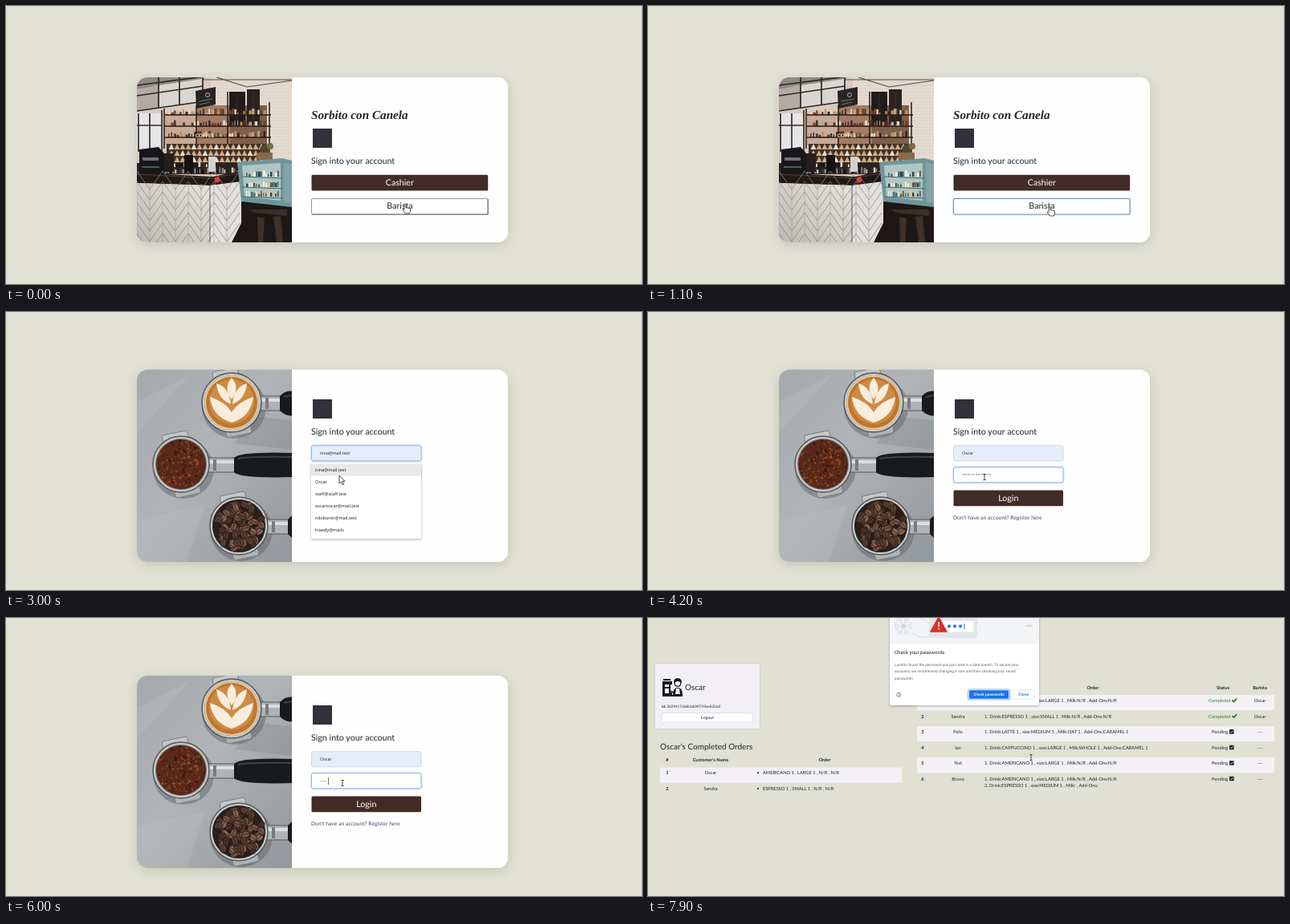
Animation, 792 px wide and 347 px high, one loop 8 s. Source, as an HTML page:

```html
<!DOCTYPE html>
<html lang="en">
<head>
<meta charset="utf-8">
<title>Coffee shop sign-in</title>
<style>
  html, body { margin: 0; width: 100%; height: 100%; overflow: hidden; background: #e1e2d4; }
  svg { display: block; }
  text { font-family: Lato, sans-serif; fill: #212529; text-rendering: geometricPrecision; }
  .mid { text-anchor: middle; }
  .bold { font-weight: 700; }
  .script { font: italic 700 15.2px "Liberation Serif", serif; }
  .field { font-family: "Noto Sans", sans-serif; }
  .dialog { font-family: Roboto, sans-serif; }
  .card { filter: drop-shadow(0 3px 7px rgba(60, 60, 40, .17)); }
  .glow { filter: drop-shadow(0 0 1px #9dbff2); }
  .pop { filter: drop-shadow(0 1px 1.5px rgba(0, 0, 0, .3)); }
</style>
</head>
<body>
<svg id="stage" width="792" height="347" viewBox="0 0 792 347"></svg>
<script>
const LOOP = 8000;
const BROWN = '#432c25';

let seed = 11;
const rnd = (a = 0, b = 1) => a + (b - a) * (seed = seed * 16807 % 2147483647) / 2147483647;
const pick = list => list[Math.floor(rnd(0, list.length))];
const times = (n, make) => Array.from({ length: n }, (_, i) => make(i)).join('');

const rect = (x, y, w, h, fill, more = '') =>
  `<rect x="${x}" y="${y}" width="${w}" height="${h}" fill="${fill}" ${more}/>`;
const circle = (x, y, r, fill, more = '') =>
  `<circle cx="${x}" cy="${y}" r="${r}" fill="${fill}" ${more}/>`;
const path = (d, fill, more = '') => `<path d="${d}" fill="${fill}" ${more}/>`;
const line = (d, stroke, width = 1) => path(d, 'none', `stroke="${stroke}" stroke-width="${width}"`);
const text = (x, y, str, size, more = '') =>
  `<text x="${x}" y="${y}" font-size="${size}" ${more}>${str}</text>`;
const mid = (x, y, str, size, cls = '', more = '') => text(x, y, str, size, `class="mid ${cls}" ${more}`);
const group = (id, body, more = '') => `<g id="${id}" ${more}>${body}</g>`;

function card(id, y, h, photo, body) {
  return `<clipPath id="${id}Clip">${rect(163, y, 462, h, '#000', 'rx="13"')}</clipPath>`
    + rect(163, y, 462, h, '#fefefe', 'rx="13" class="card"')
    + `<g clip-path="url(#${id}Clip)"><g>${photo}</g>${rect(356, y, 270, h, '#fefefe')}</g>` + body;
}

function cafePhoto() {
  const goods = (x, y, w, n, colors) => times(n, i => {
    const h = rnd(3, 8);
    return rect(x + i * w / n, y - h, rnd(1, w / n), h, pick(colors));
  });
  const warm = ['#c98e4f', '#e8d8bd', '#7c3d25', '#2d2825', '#b5a690', '#4a3329'];
  const dark = ['#18181a', '#2b2423', '#39322f', '#0f1012', '#8d8680', '#d8d4ce'];
  return `<linearGradient id="shade" x1="1" y1="0" x2="0" y2="1"><stop stop-color="#e6e2dc"/>
      <stop offset="1" stop-color="#bdb9b4"/></linearGradient>`
    + rect(163, 89, 193, 206, '#d9cac0')
    + rect(255, 89, 101, 104, '#e4dad0')
    + times(24, i => line(`M255 ${91 + i * 4}h101`, '#cfc4b9', .5))
    + path('M163 89H247V93L163 104Z', '#8d8a86')
    + path('M163 105L190 98V127L163 131Z', '#b5aaa2') + path('M190 99L244 91V119L190 127Z', '#d9d5d1')
    + line('M163 99L247 88M163 131L247 119M190 89V128M216 89V124M245 89V120M163 112L245 100', '#2d2523', 1.7)
    + line('M247 92H356M262 89L300 101 356 93', '#5b4a40', 1.2)
    + rect(163, 134, 31, 48, '#e3e5e6') + line('M165 134V182M179 134V182M194 130V190M163 149H194', '#3b2b25', 1.7)
    + rect(197, 134, 40, 40, '#c8aa98') + rect(237, 124, 42, 50, '#a17c64') + rect(279, 124, 46, 50, '#7d5f4d')
    + rect(278, 107, 20, 43, '#211b1a') + rect(300, 104, 16, 44, '#2a2220') + line('M288 110V148M308 107V146', '#4a3830', .8)
    + path('M236 106L261 101V123L237 128Z', '#272425') + circle(251, 111, 2.5, 'none', 'stroke="#d8d2ca" stroke-width=".8"')
    + line('M240 119L257 116M241 123L254 120', '#8f8881', .8)
    + [136, 150, 164].map(y => goods(202, y, 122, 34, warm) + line(`M198 ${y}H330`, '#241a17', 1.3)).join('')
    + line('M197 128V178M237 124V176M276 107V176M328 120V186', '#241a17', 1.5)
    + mid(247.5, 163.5, 'COFFEE', 6.3, 'bold', 'style="fill:#fff1d2"')
    + rect(200, 172, 126, 24, '#42302a')
    + times(54, i => {
        const x = 206 + i % 18 * 7, y = 172 + Math.floor(i / 18) * 8;
        return path(`M${x} ${y}l3.5 7h-7z`, i % 4 ? '#d3ad80' : '#eee0c7');
      })
    + rect(163, 196, 127, 14, '#2b2321') + goods(198, 209, 92, 30, dark) + goods(202, 201, 50, 16, dark)
    + path('M166 179L190 176 197 184V210H166Z', '#17171a') + rect(170, 189, 20, 4, '#6d7074') + rect(169, 200, 22, 2, '#55575b')
    + rect(197, 184, 12, 23, '#241f1e') + rect(222, 186, 11, 22, '#121214') + rect(252, 188, 9, 19, '#d3d2d0')
    + circle(322, 179, 6, '#4f4632') + circle(329, 175, 4, '#7a6a48') + rect(312, 183, 20, 9, '#8b6a4b')
    + path('M163 208L258 213 293 206V220L254 224 163 221Z', '#211917') + line('M163 210L257 215 293 208', '#5b4038', .9)
    + path('M163 221L254 224V295H163Z', 'url(#shade)') + path('M254 224L293 219V271L282 295H254Z', '#e2e0dd')
    + times(4, i => {
        const x = 163 + i * 32;
        return line(`M${x} 222V295M${x + 16} 222V295`, '#a9a5a0', .7)
          + times(8, j => line(`M${x} ${206 + j * 13}l16 23 16-23`, '#8f8a85', .8));
      })
    + path('M293 219L356 249V295H281L293 271Z', '#1d1715')
    + path('M302 254H350V262L310 258Z', '#3d2e27') + path('M313 263L322 265 320 295H314ZM333 263L342 262 345 295H337Z', '#3f3029')
    + path('M288 195L344 190 356 193V251L293 244Z', '#6f959a')
    + path('M294 199L342 196V243L297 238Z', '#adc6c6') + path('M346 196L356 197V246L346 244Z', '#83a3a7')
    + [213, 226, 238].map(y => goods(299, y, 42, 14, ['#e5c78d', '#f5efdd', '#6d5138', '#4f7074', '#2f4447'])
        + line(`M294 ${y}L344 ${y + 2}`, '#456569', 1.2)).join('')
    + circle(263, 217, 3.5, '#d84330') + line('M254 221V295', '#4d3b34', .8)
    + path('M163 285L168 295H163Z', '#282220');
}

function basket(x, y, r, handle) {
  const start = x + r - 4;
  return `<ellipse cx="${x + 3}" cy="${y + 6}" rx="${r + 3}" ry="${r + 2}" fill="#62676b" opacity=".5"/>`
    + rect(x - 16, y - r - 5, 32, 14, '#c3c7c9', `rx="3" stroke="#7b7f82" transform="rotate(-12 ${x} ${y})"`)
    + rect(x - 15, y + r - 9, 32, 14, '#b0b4b7', `rx="3" stroke="#7b7f82" transform="rotate(-12 ${x} ${y})"`)
    + rect(start, y - 8, handle - start + 4, 18, '#aeb3b6', 'stroke="#54585b"')
    + rect(start, y - 5, handle - start + 4, 4, '#dbdee0')
    + rect(start + 9, y - 6, 4, 14, '#777c80')
    + path(`M${handle} ${y - 8}Q${handle + 8} ${y - 16} 358 ${y - 14}V${y + 16}Q${handle + 8} ${y + 18} ${handle} ${y + 10}Z`, '#191a1c')
    + line(`M${handle + 5} ${y - 7}Q${handle + 20} ${y - 10} 358 ${y - 9}`, '#404347', 2)
    + circle(x, y, r, '#c4c8ca', 'stroke="#54585b" stroke-width="1.5"')
    + circle(x, y, r - 3, '#777b7e');
}

const inDisc = (x, y, r, make) => {
  const a = rnd(0, 2 * Math.PI), d = r * Math.sqrt(rnd());
  return make(x + d * Math.cos(a), y + d * Math.sin(a));
};

function filtersPhoto() {
  const petals = path('M281 82q11 13 0 27q-11-14 0-27M262 89q16 5 18 26q-16-6-18-26M300 89q-16 5-18 26q16-6 18-26'
    + 'M254 106q3 25 27 32q24-7 27-32q-19 6-27 19q-8-13-27-19', '#f8eddc');
  const beans = times(100, () => inDisc(290, 267, 29, (x, y) =>
    `<g transform="translate(${x} ${y}) rotate(${rnd(0, 180)})">
      <ellipse rx="5.2" ry="3.7" fill="${pick(['#5b4033', '#7a5645', '#49332a', '#8a6653'])}" stroke="#211714" stroke-width=".7"/>
      <path d="M-4.4 0Q0 1.3 4.4 0" fill="none" stroke="#2a1c17" stroke-width=".7"/></g>`));
  return `<linearGradient id="metal" x2="1" y2="1"><stop stop-color="#a4a9ac"/>
      <stop offset=".45" stop-color="#b1b4b7"/><stop offset="1" stop-color="#92979b"/></linearGradient>`
    + rect(163, 72, 193, 240, 'url(#metal)')
    + path('M163 112L230 78 163 151ZM163 260L248 241 225 312H163Z', '#bec1c3', 'opacity=".25"')
    + path('M305 130L356 135V172L285 164Z', '#777d82', 'opacity=".3"')
    + basket(281, 113, 37, 341) + circle(281, 113, 34, '#e7c697') + circle(281, 113, 32, '#bd762f')
    + circle(281, 112, 28, '#cd8b43') + petals
    + basket(218, 190, 35, 284) + circle(218, 190, 31, '#5a2919')
    + times(220, () => inDisc(218, 190, 30, (x, y) => circle(x, y, rnd(.6, 1.7), pick(['#7c3c22', '#3a1a12', '#96502d', '#4d2116']))))
    + basket(290, 267, 36, 351) + circle(290, 267, 33, '#2c1e19') + beans;
}

const button = (y, w, label) => rect(380.5, y, w, 19.8, BROWN, 'rx="1.5"')
  + mid(380.5 + w / 2, y + 13, label, 10.7, '', 'style="fill:#fff"');

const roleScene = card('role', 89, 206, cafePhoto(),
  text(380, 141, 'Sorbito con Canela', 15.2, 'class="script"')
  + rect(382, 153, 24, 24, '#303139')
  + text(380, 196.7, 'Sign into your account', 10.7)
  + button(210.7, 219.7, 'Cashier')
  + group('baristaIdle', rect(380.5, 240.5, 219.5, 19.5, '#fff', 'rx="1.5" stroke="#8b8b8f" stroke-width=".9"')
    + line('M381 260.2H600.2V241', '#66666a', .9))
  + group('baristaFocus', rect(380.5, 240.5, 219.5, 19.5, '#fff', 'rx="1.5" stroke="#7893aa" stroke-width="1.1" class="glow"'))
  + mid(490.5, 253.4, 'Barista', 10.7));

const input = (id, y, fill) =>
  rect(380.5, y, 136.5, 19, fill, `id="${id}" rx="2"`);
const logins = ['nina@mail.test', 'Oscar', 'staff@staff.test', 'oscaroscar@mail.test', 'nilobonin@mail.test', 'howdy@mails'];

const loginScene = card('login', 72, 240, filtersPhoto(),
  rect(382, 109, 24, 24, '#303139')
  + text(380, 152.5, 'Sign into your account', 10.7)
  + input('user', 166.8, '#fff') + text(391, 178, '', 5.3, 'id="userText" class="field"')
  + input('pass', 193.8, '#fff') + text(391, 206, '', 6, 'id="passText" class="field"')
  + rect(391.5, 199, .7, 9, '#333', 'id="caret"')
  + button(222.5, 136.5, 'Login')
  + text(380, 259, "Don't have an account? Register here", 6.8, 'style="fill:#454a66"')
  + group('menu', rect(380, 188, 137, 95, '#fff', 'class="pop"')
    + rect(380, 190, 137, 14.5, '#e8e7e9', 'id="hover"')
    + logins.map((s, i) => text(385, 199 + i * 15, s, 5.5, 'class="field"')).join('')));

const orders = [
  ['Oscar', 'AMERICANO 1 , size:LARGE 1 , Milk:N/R , Add-Ons:N/R'],
  ['Sandra', 'ESPRESSO 1 , size:SMALL 1 , Milk:N/R , Add-Ons:N/R'],
  ['Felix', 'LATTE 1 , size:MEDIUM 1 , Milk:OAT 1 , Add-Ons:CARAMEL 1'],
  ['Ian', 'CAPPUCCINO 1 , size:LARGE 1 , Milk:WHOLE 1 , Add-Ons:CARAMEL 1'],
  ['Test', 'AMERICANO 1 , size:LARGE 1 , Milk:N/R , Add-Ons:N/R'],
  ['Bruno', 'AMERICANO 1 , size:LARGE 1 , Milk:N/R , Add-Ons:N/R']
];
const head = (y, cells) => cells.map(([x, s]) => mid(x, y, s, 5.7, 'bold')).join('');
const stripe = (x, y, w) => rect(x, y, w, 19, '#f3f1f5');

const orderRow = ([name, drink], i) => {
  const y = 105 + i * 19.55, done = i < 2;
  return (i % 2 ? '' : stripe(335, y - 9, 445))
    + mid(342, y, i + 1, 5.7, 'bold') + mid(386, y, name, 5.7)
    + text(419, y, `1. Drink:${drink}`, 5.75)
    + (done
      ? text(698, y, 'Completed', 5.7, 'style="fill:#23852b"') + line(`M727.5 ${y - 2.4}l2 2 3.6-4`, '#157a1e', 1.6)
      : text(702, y, 'Pending', 5.7) + rect(724, y - 5, 5.6, 5.6, '#1c1f22', 'rx=".8"')
        + line(`M725.2 ${y - 2.2}l1.2 1.2 2.2-2.4`, '#fff', .8))
    + mid(762, y, done ? 'Oscar' : '---', 5.7);
};

const mokaPot = path('M353 22l3-4h9l2 4-2 6h-9zM355 29h11l3 10h-16z', '#9da2a8')
  + path('M358 18h3l-1 21h-4zM364 29h2l3 10h-3z', '#c9cdd2') + rect(355, 27.5, 11, 2, '#686d73')
  + circle(361, 16.5, 1.4, '#383b40') + line('M366 19h4.5v10', '#383b40', 1.8);

const baristaIcon = path('M18 79h12v4h-2v10h2v4H18zM21 83v3h5v-3zM21 88v6h5v-6z', '#17191c', 'fill-rule="evenodd"')
  + rect(19, 76, 9, 2, '#17191c') + rect(18, 96, 25, 2, '#17191c')
  + circle(37, 81.5, 3.8, '#f2f0f4', 'stroke="#17191c" stroke-width="1.3"')
  + path('M32 81q0-6 5-6t5 6q-5-4-10 0M31 96q0-9 6-9t6 9z', '#17191c') + path('M35 88h4l1 7h-6z', '#f2f0f4')
  + line('M27 91l5 2', '#17191c', 1.6);

const profileScene = rect(0, 0, 792, 347, '#e0e1d3')
  + mokaPot + text(376, 30, "Oscar's Profile", 10.5, 'class="script" style="font-size:10.5px"')
  + rect(9, 57, 130, 81, '#f2f0f4', 'style="filter:drop-shadow(0 .5px 1px rgba(0,0,0,.15))"')
  + baristaIcon + text(46, 90, 'Oscar', 10)
  + text(17, 112, '<tspan class="bold">id:</tspan> 5029417c86b1d04f739ae8256d', 4.6)
  + rect(17, 118.7, 113.5, 11.5, '#fefefe', 'rx="1.5" stroke="#d2d0d5" stroke-width=".6"') + mid(74, 126.2, 'Logout', 5.3)
  + text(15, 163.7, "Oscar's Completed Orders", 10)
  + head(179.3, [[24, '#'], [78, "Customer's Name"], [220, 'Order']])
  + stripe(15, 186.7, 301)
  + [['Oscar', 'AMERICANO 1 , LARGE 1 , N/R , N/R'], ['Sandra', 'ESPRESSO 1 , SMALL 1 , N/R , N/R']].map(([name, drink], i) => {
      const y = 195.3 + i * 19.5;
      return mid(24, y, i + 1, 5.7, 'bold') + mid(78, y, name, 5.7) + circle(137, y - 2, 1.1, '#212529') + text(143, y, drink, 5.7);
    }).join('')
  + text(335, 73.5, 'All Orders', 10.2)
  + head(88.8, [[342, '#'], [386, "Customer's Name"], [554, 'Order'], [716, 'Status'], [762, 'Barista']])
  + orders.map(orderRow).join('')
  + text(419, 211, '2. Drink:ESPRESSO 1 , size:MEDIUM 1 , Milk: , Add-Ons:', 5.7);

const dialog = rect(301, -8, 186, 117, '#fff', 'rx="2" class="pop"')
  + rect(301, 0, 186, 32, '#f3f4f6')
  + circle(318, 10, 11, '#e6e8eb') + line('M308 4l20 13M309 17l18-14M318-1v23', '#f8f9fa', 1.5) + circle(318, 10, 3, '#d5d8dc')
  + line('M330 19q10 8 20 4M338 0q9 2 12 8', '#dadde1', 1)
  + rect(350, -4, 60, 29, '#e4e7ea', 'rx="3"') + rect(364, 3, 42, 15, '#fff', 'rx="2.5" stroke="#d5dae0" stroke-width=".7"')
  + [375, 382, 389].map(x => circle(x, 10.3, 2, '#1a73e8')).join('') + rect(393.5, 7, 1, 7, '#1a73e8')
  + path('M362-1L372 17H352Z', '#d93025', 'stroke="#d93025" stroke-width="1.5" stroke-linejoin="round"')
  + rect(361.2, 5, 1.6, 6, '#fff') + circle(362, 13.6, 1, '#fff')
  + path('M470 11q0-3 3-2q2-3 4 0q3 0 2 2z', '#d9dce0')
  + text(307, 45, 'Check your passwords', 6.2, 'class="dialog"')
  + ['Lumbro found the password you just used in a data breach. To secure your',
     'accounts, we recommend changing it now and then checking your saved',
     'passwords.'].map((s, i) => text(307, 60 + i * 8.4, s, 4.7, 'class="dialog" style="fill:#5f6368"')).join('')
  + circle(312.3, 95.7, 2.6, 'none', 'stroke="#4c5055" stroke-width=".7"') + rect(312, 95, .7, 2.2, '#4c5055') + rect(312, 93.9, .7, .7, '#4c5055')
  + rect(398.6, 89, 52, 13, '#fff', 'rx="2" stroke="#8ab4f3" stroke-width="1.2"') + rect(400, 90.3, 49.2, 10.4, '#1a73e8', 'rx="1.2"')
  + mid(424.5, 97.4, 'Check passwords', 4.9, 'dialog', 'style="fill:#fff;font-weight:500"')
  + rect(454, 89.8, 27, 11.5, '#fff', 'rx="1.5" stroke="#dadce0" stroke-width=".7"')
  + mid(467.5, 97.4, 'Close', 5, 'dialog', 'style="fill:#1a73e8;font-weight:500"');

const outline = 'stroke="#222" stroke-width=".8" stroke-linejoin="round"';
const cursors = group('hand', path('M-1 .8Q0-.8 1 .8V5q1-1 2 .2q1-.8 2 .4q1.5-.4 1.5 1V9.5L5.3 12H.2L-3 7.4q.8-1.5 2 0z', '#fff', outline))
  + group('arrow', path('M0 0V10l2.3-2.2 1.7 4 1.7-.8-1.7-3.7H7z', '#fff', outline))
  + group('beam', line('M-1.6-3.5H1.6M0-3.5V3.5M-1.6 3.5H1.6', '#333', .9));

document.getElementById('stage').innerHTML = rect(0, 0, 792, 347, '#e1e2d4')
  + group('roleScene', roleScene) + group('loginScene', loginScene) + group('profileScene', profileScene)
  + rect(791, 0, 1, 347, '#cfd0c6') + group('dialog', dialog) + group('cursor', cursors);

const $ = id => document.getElementById(id);
const show = (id, on) => { $(id).style.display = on ? '' : 'none'; };
const between = (t, a, b) => t >= a && t < b;

const track = [[0, 497, 247], [100, 497, 247], [900, 500, 250], [1600, 500, 250], [2100, 430, 178], [2800, 430, 178],
  [3000, 415, 204], [3300, 417, 211], [3450, 417, 211], [3600, 419, 206], [7400, 419, 206], [7900, 477, 174], [LOOP, 477, 174]];

function cursorAt(t) {
  const i = track.findIndex(k => k[0] > t);
  const [t0, x0, y0] = track[i - 1], [t1, x1, y1] = track[i];
  const p = (t - t0) / (t1 - t0), e = p * p * (3 - 2 * p);
  return [x0 + (x1 - x0) * e, y0 + (y1 - y0) * e];
}

function setField(id, focused, fill) {
  const el = $(id);
  el.setAttribute('fill', fill);
  el.setAttribute('stroke', focused ? '#91b5ee' : '#ced6e2');
  el.setAttribute('class', focused ? 'glow' : '');
}

function setText(id, str, color) {
  $(id).textContent = str;
  $(id).style.fill = color;
}

function render(t) {
  show('roleScene', t < 1200);
  show('loginScene', between(t, 1200, 6500));
  show('profileScene', t >= 6500);
  show('dialog', t >= 7300);
  show('baristaIdle', t < 1000);
  show('baristaFocus', t >= 1000);

  const row = t < 3150 ? 0 : 1, filled = t >= 2900;
  show('menu', between(t, 2200, 3450));
  show('hover', filled);
  $('hover').setAttribute('y', 190 + row * 15);
  setField('user', between(t, 2100, 3700), filled ? '#e5edfb' : '#fff');
  setText('userText', filled ? logins[row] : 'Username', filled ? '#222' : '#858a90');

  const typed = Math.max(0, Math.min(5, Math.floor((t - 4800) / 200)));
  setField('pass', t >= 3700, '#fff');
  setText('passText', typed ? '·'.repeat(typed) : '***********', typed ? '#555' : '#858a90');
  $('passText').style.fontWeight = typed ? 700 : 400;
  show('caret', t >= 3700 && (typed || (t - 3700) % 1000 < 500));
  $('caret').setAttribute('x', 391.5 + typed * 1.9);

  const [x, y] = cursorAt(t);
  const beam = between(t, 2000, 2850) || t >= 3500;
  $('cursor').setAttribute('transform', `translate(${x} ${y})`);
  show('hand', t < 1200);
  show('arrow', t >= 1200 && !beam);
  show('beam', beam);
}

function tick() {
  render(performance.now() % LOOP);
  requestAnimationFrame(tick);
}
tick();
</script>
</body>
</html>
```
